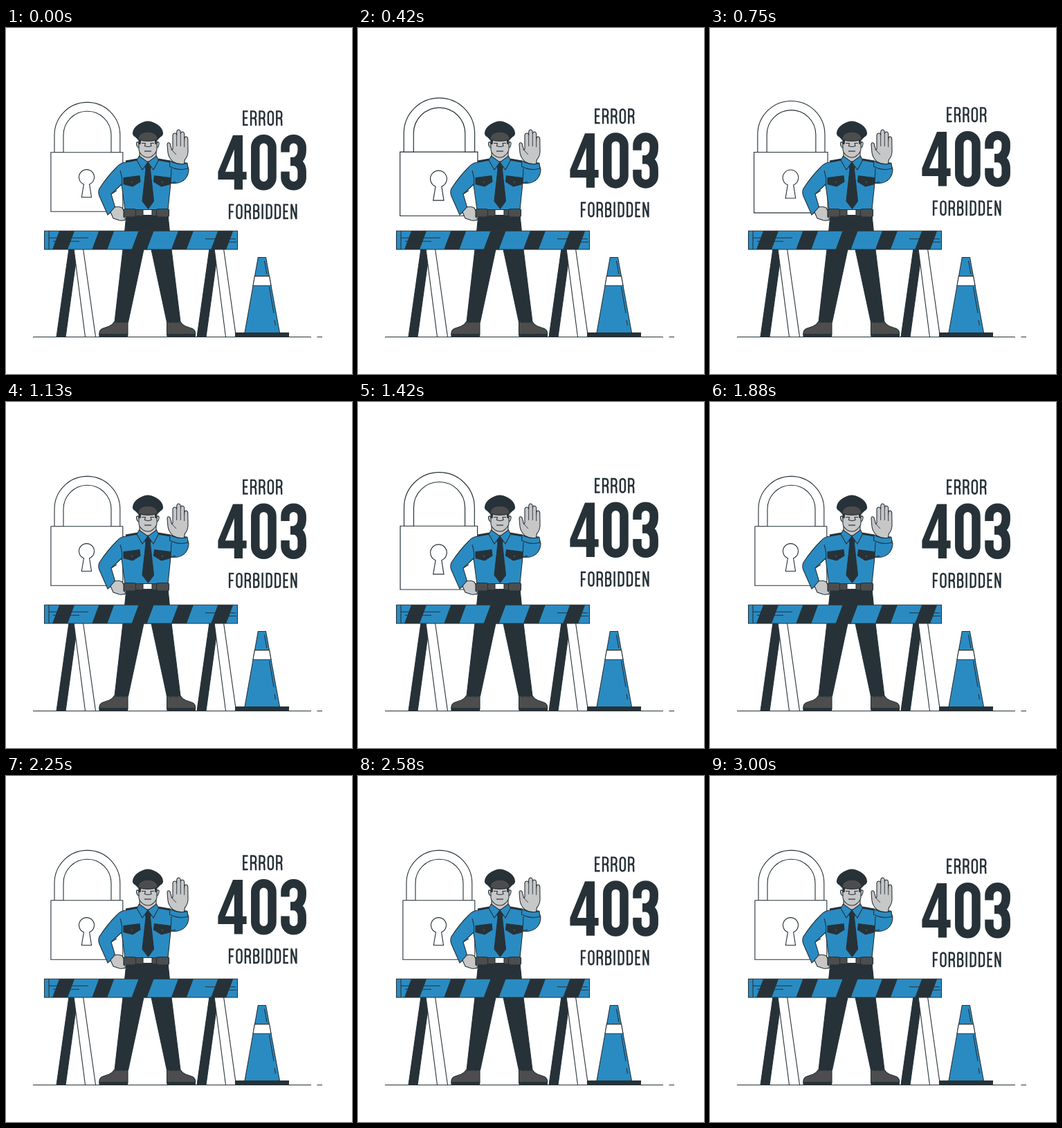
These frames come from a looping animation (500x500 px, 3040 ms). An HTML page with a canvas:

```html
<!DOCTYPE html>
<html lang="en">
<head>
<meta charset="utf-8">
<title>Error 403 Forbidden</title>
<style>
html, body { margin: 0; width: 100%; height: 100%; overflow: hidden; background: #fff; }
canvas { display: block; width: 500px; height: 500px; }
</style>
</head>
<body>
<canvas id="stage" role="img" aria-label="Error 403 Forbidden"></canvas>
<script>
const INK = '#263238', BLUE = '#2a8bc2', SKIN = '#c7c7c7', GREY = '#4d4d4d', WHITE = '#fff';
const LOOP = 3040, CYCLE = 3000;

const canvas = document.getElementById('stage');
const ctx = canvas.getContext('2d');
const dpr = window.devicePixelRatio || 1;
canvas.width = canvas.height = 500 * dpr;

function shape(d, fill, line = 1.1) {
  const p = new Path2D(d);
  if (fill) {
    ctx.fillStyle = fill;
    ctx.fill(p, 'evenodd');
  }
  if (line) {
    ctx.strokeStyle = INK;
    ctx.lineWidth = line;
    ctx.stroke(p);
  }
}
const stroke = (d, w = 1.1) => shape(d, null, w);

// Linear interpolation through [time, value] stops
function track(stops, t) {
  for (let i = 1; i < stops.length; i++) {
    const [t0, a] = stops[i - 1], [t1, b] = stops[i];
    if (t <= t1) return a + (b - a) * (t - t0) / (t1 - t0);
  }
  return stops[stops.length - 1][1];
}

const BEAT = [[0, 1], [300, 1.1], [900, 1], [1200, 1], [1500, 1.1], [1800, 1], [CYCLE, 1]];
const FLOAT = [[0, 0], [CYCLE / 2, -10], [CYCLE, 0]];

// Condensed capitals: [advance, path], 22 units high
const GLYPHS = {
  E: [10.8, 'M7.6 1.2H1.3V20.8H7.6M1.3 10.8H6.8'],
  F: [10.4, 'M7.5 1.2H1.3V22M1.3 11.2H6.7'],
  R: [12.4, 'M1.3 22V1.2H4.2Q8.3 1.2 8.3 5.2V7.2Q8.3 11.2 4.2 11.2H1.3M4.2 11.2Q8.1 11.2 8.1 15V18.4Q8.1 21 8.7 22'],
  O: [12.4, 'M1.3 5A3.5 3.8 0 0 1 8.3 5V17A3.5 3.8 0 0 1 1.3 17Z'],
  B: [12.3, 'M1.3 1.2H4.2Q7.9 1.2 7.9 5V6.7Q7.9 10.4 4.2 10.4H1.3M4.2 10.4Q8.2 10.4 8.2 14.4V16.8Q8.2 20.8 4.2 20.8H1.3V1.2'],
  I: [6.1, 'M1.3 0V22'],
  D: [12.5, 'M1.3 1.2H4Q8.2 1.2 8.2 5.4V16.6Q8.2 20.8 4 20.8H1.3Z'],
  N: [11, 'M1.3 22V0M8.2 22V0M1.5 1L8 21']
};

function word(text, x, y) {
  ctx.save();
  ctx.translate(x, y);
  for (const ch of text) {
    const [step, d] = GLYPHS[ch];
    stroke(d, 2.45);
    ctx.translate(step, 0);
  }
  ctx.restore();
}

function message(dy) {
  ctx.save();
  ctx.translate(0, dy);
  word('ERROR', 342, 119.2);
  shape('M328 155H342V207.8H347.6V219H342V233.5H329.8V219H306.4V207.8ZM316.8 207.8H329.8V175.5Z', INK, 0);
  stroke('M360.3 172.3A12.1 12.1 0 0 1 384.5 172.3V216.2A12.1 12.1 0 0 1 360.3 216.2Z', 12.5);
  stroke('M403.5 179.5V172.3A12.1 12.1 0 0 1 427.7 172.3V176.5Q427.7 189.5 417 193H411M417 193Q427.7 195.5 427.7 208V216.2A12.1 12.1 0 0 1 403.5 216.2V207.5', 12.5);
  word('FORBIDDEN', 321.8, 254.2);
  ctx.restore();
}

function lock(scale) {
  ctx.save();
  ctx.translate(117, 186);
  ctx.scale(scale, scale);
  ctx.translate(-117, -186);
  shape('M70 180V154.8A47.4 47.4 0 0 1 164.8 154.8V180H152V154.8A34.5 34.5 0 0 0 83 154.8V180Z', WHITE);
  shape('M64.9 179.7H168.8V265.2H64.9Z', WHITE);
  shape('M112.4 225.8A11 11 0 1 1 120.6 225.8L123.5 244.5H109.3Z', WHITE);
  ctx.restore();
}

function trousers() {
  shape('M174 270H234L239 320L252 425H232.5L210 320H199L176.5 425H157L169 320Z', INK);
  // The same shoe, mirrored for the other foot
  for (const flip of [false, true]) {
    ctx.save();
    if (flip) {
      ctx.translate(408.5, 0);
      ctx.scale(-1, 1);
    }
    shape('M156.5 424.5Q166 427 176 424.5V444H135Q134 437 139 434.5L149 431Q154 429 156.5 424.5Z', GREY);
    shape('M134.5 442H176V446.5H134.5Z', INK, 0);
    ctx.restore();
  }
}

function torso() {
  shape('M190 190.5L173 194Q165 195 160 201Q146 215 135 232Q132.5 237 135 243L147 270L158 260L152 240L167 226L172 263H234L238 224Q252 226 259 218Q264 212 264 204L261 195L238 193L220 190.5Z', BLUE);
  stroke('M165 206Q169 218 167 228M152 240L160 235M239 203L238 224M238 224L245 222');
  shape('M237 192Q249 199 262 195.5L263 203Q250 207 236.5 200Z', BLUE);
  stroke('M173 193L190 190M220 190L237 193', 3);
  // Pocket flaps
  shape('M170 216.5L193 213.5L194 222L183 229L170 225.5Z', INK);
  shape('M237.5 216.5L214.5 213.5L213.5 222L224.5 229L237.5 225.5Z', INK);
  ctx.fillStyle = GREY;
  for (const x of [182, 226]) {
    ctx.beginPath();
    ctx.arc(x, 223, 1.2, 0, 7);
    ctx.fill();
  }
  // Neck, collar and tie
  shape('M193 178V189L205 195L217 189V178Z', SKIN);
  shape('M200 193H210L208.5 205L213.5 250L205.5 261L197 250L202 205Z', INK);
  shape('M192.5 185L205 194L197 205L189 191Z', BLUE);
  shape('M217.5 185L205 194L213 205L220.5 191Z', BLUE);
}

function belt() {
  shape('M170 262.5H235V271.5H170Z', GREY);
  shape('M173 261.5H185Q187.5 261.5 187.5 264V270Q187.5 273 185 273H173Q170 273 170 270V264Q170 261.5 173 261.5Z', GREY);
  shape('M220 261.5H233Q235.5 261.5 235.5 264V270Q235.5 273 233 273H220Q217.5 273 217.5 270V264Q217.5 261.5 220 261.5Z', GREY);
  shape('M198 262.5H211V270.5H198Z', WHITE);
}

function hands() {
  shape('M151 266L157 259Q163 257 168 260L170 264V273L174 276Q171 279 164 278L155 275Z', SKIN);
  shape('M241 193Q235 187 234 180L233 168Q234 164 237 167L239.5 176L241 175V154.5Q241.5 152 244 152Q246.5 152 246.7 155V150.5Q247 147 249.6 147Q252.3 147.5 252.3 151V153Q252.5 150 255 150Q257.7 150.5 257.7 154V160Q258.5 156.5 260.5 157Q262.8 157.5 262.8 161L263 179Q262.5 186 258.5 190L257.5 196Q249 198 241 193Z', SKIN);
  stroke('M246.7 155V171M252.3 153V171M257.7 160V172M239.5 176L246 183', .9);
}

function head() {
  shape('M192 166Q188 163 188.5 168Q190 174 193 173ZM217.5 166Q222 163 221 168Q220 174 217 173Z', SKIN);
  shape('M192 157H218V176Q217 181 210 186Q205 188 200 186Q193 182 192 176Z', SKIN);
  shape('M191.5 156H196L194.5 168H192ZM218 156H214L215.5 168H217.5Z', INK, 0);
  stroke('M196 166.5H201M209 166.5H214M201.5 166L200.5 170.5Q205.5 172.5 210 170.5L209 166');
  stroke('M200 178H210', 1.2);
  shape('M183.5 152Q184 144 193 139Q200 135 205 135Q210 135 217 139Q226 144 226.5 152Q226.5 155.5 223 157L219 161H191L187 157Q183.5 155.5 183.5 152Z', INK);
  shape('M191 161Q191 151 205 150Q219 151 219 161Q205 166 191 161Z', GREY);
}

function barrier() {
  for (const x of [0, 203]) {
    ctx.save();
    ctx.translate(x, 0);
    shape('M91 319H103.5L86 446.5H73Z', INK);
    shape('M98 319H111.5L129.5 446.5H114.5Z', WHITE);
    ctx.restore();
  }
  shape('M55.5 293.2H334.5V320H55.5Z', BLUE, 0);
  for (let i = 0; i < 5; i++) {
    const x = 77 + i * 57.3;
    shape(`M${x} 293.2h22l-10 26.8h-22Z`, INK, 0);
  }
  stroke('M55.5 293.2H334.5V320H55.5ZM62 293V320');
  stroke('M62 303.3H119M68 308.3H106M288 304.8H332M321 309.3H333');
}

function cone() {
  shape('M364.3 331.5H375.5L395.5 440.5H345Z', BLUE);
  shape('M359.4 358.6H380.6L383 372.2H357Z', WHITE);
  stroke('M373.5 336.5L377 356M380.5 374L387 412M388 422L389.5 430');
  shape('M331.5 440.5H408.5V446.5H331.5Z', INK);
}

function draw(now) {
  const t = Math.min(now % LOOP, CYCLE);
  ctx.setTransform(dpr, 0, 0, dpr, 0, 0);
  ctx.fillStyle = WHITE;
  ctx.fillRect(0, 0, 500, 500);
  stroke('M39 446.5H441M449.5 446.5H457');
  lock(track(BEAT, t));
  trousers();
  torso();
  belt();
  hands();
  head();
  barrier();
  cone();
  message(track(FLOAT, t));
}

const start = performance.now();
function frame() {
  draw(performance.now() - start);
  requestAnimationFrame(frame);
}
frame();
</script>
</body>
</html>
```
